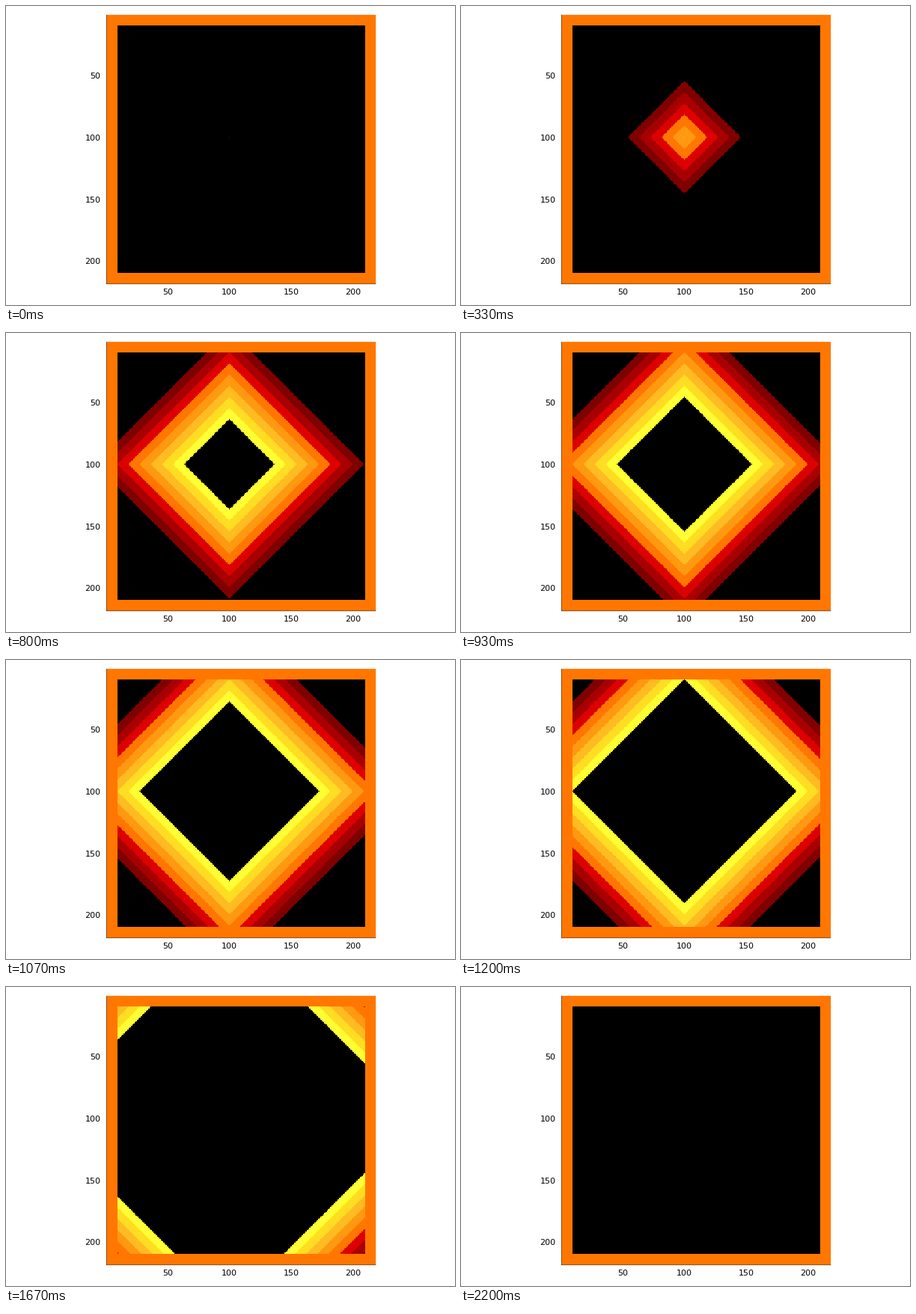
A matplotlib script that plays this animation: 600x400 px, repeating every 2270 ms.

```python
import matplotlib.pyplot as plt
import numpy as np
from matplotlib.animation import FuncAnimation
from matplotlib.colors import to_rgb

WIDTH, HEIGHT, DPI = 600, 400, 100
LOOP_MS, TICK_MS, STEPS_PER_SECOND = 2270, 10, 15

CELLS, MARGIN, SOURCE = 218, 9, 99
BAND = 9  # cells the wave travels per step, also the width of one colour

# Plot area in pixels; the cells are sampled on a slightly larger pixel grid.
LEFT, TOP, SIDE = 134.4, 11.8, 359.8
WINDOW_X, WINDOW_Y, WINDOW = 134, 11, 361
GRID_X, GRID_Y, CELL_PX = 133.75, 10.75, 361 / CELLS

BLACK, FRAME_COLOR = "#000000", "#ff7700"
FIRE = ["#800000", "#a80000", "#dd0000", "#ff7700",
        "#ff9911", "#ffbb22", "#ffdd22", "#ffff33"]
PALETTE = np.array([to_rgb(c) for c in [BLACK, *FIRE, FRAME_COLOR]])
WALL = len(PALETTE) - 1


def cell_index(first_pixel, origin):
    centers = first_pixel + np.arange(WINDOW) + 0.5
    return np.clip(((centers - origin) // CELL_PX).astype(int), 0, CELLS - 1)


def coverage(first_pixel, start):
    pixel = first_pixel + np.arange(WINDOW)
    return np.clip(np.minimum(pixel + 1, start + SIDE) - np.maximum(pixel, start), 0, 1)


cells = np.ix_(cell_index(WINDOW_Y, GRID_Y), cell_index(WINDOW_X, GRID_X))
alpha = np.outer(coverage(WINDOW_Y, TOP), coverage(WINDOW_X, LEFT))
offset = np.abs(np.arange(CELLS) - SOURCE)
distance = offset[:, None] + offset[None, :]
wall = np.ones((CELLS, CELLS), dtype=bool)
wall[MARGIN:-MARGIN, MARGIN:-MARGIN] = False


def wave_image(step):
    age = step * BAND - distance
    burning = (age >= 0) & (age < BAND * len(FIRE))
    state = np.where(burning, age // BAND + 1, 0)
    state[wall] = WALL
    return np.dstack([PALETTE[state[cells]], alpha])


fig = plt.figure(figsize=(WIDTH / DPI, HEIGHT / DPI), dpi=DPI, facecolor="white")
ax = fig.add_axes([0, 0, 1, 1])
image = ax.imshow(wave_image(0), interpolation="nearest", aspect="auto", zorder=3,
                  extent=(WINDOW_X, WINDOW_X + WINDOW, WINDOW_Y + WINDOW, WINDOW_Y))
ax.set(xlim=(0, WIDTH), ylim=(HEIGHT, 0))
ax.axis("off")

# The axis lines lie partly under the image.
ax.plot([LEFT, LEFT, LEFT + SIDE], [TOP, TOP + SIDE, TOP + SIDE],
        color="black", lw=0.72, snap=False, solid_capstyle="butt", zorder=2)

text = dict(family="DejaVu Sans", size=8, color="black", va="baseline")
for value in (50, 100, 150, 200):
    shift = (value - 0.5) * SIDE / CELLS
    ax.text(LEFT + shift, 386.5, str(value), ha="center", **text)
    ax.text(126.5, TOP + shift + 4, str(value), ha="right", **text)


def update(tick):
    # Steps start at times rounded to whole ticks.
    step = int((tick + 0.5) * TICK_MS * STEPS_PER_SECOND / 1000)
    image.set_data(wave_image(step))
    return [image]


anim = FuncAnimation(fig, update, frames=LOOP_MS // TICK_MS, interval=TICK_MS,
                     repeat=True, repeat_delay=0, blit=False)
plt.show()
```
